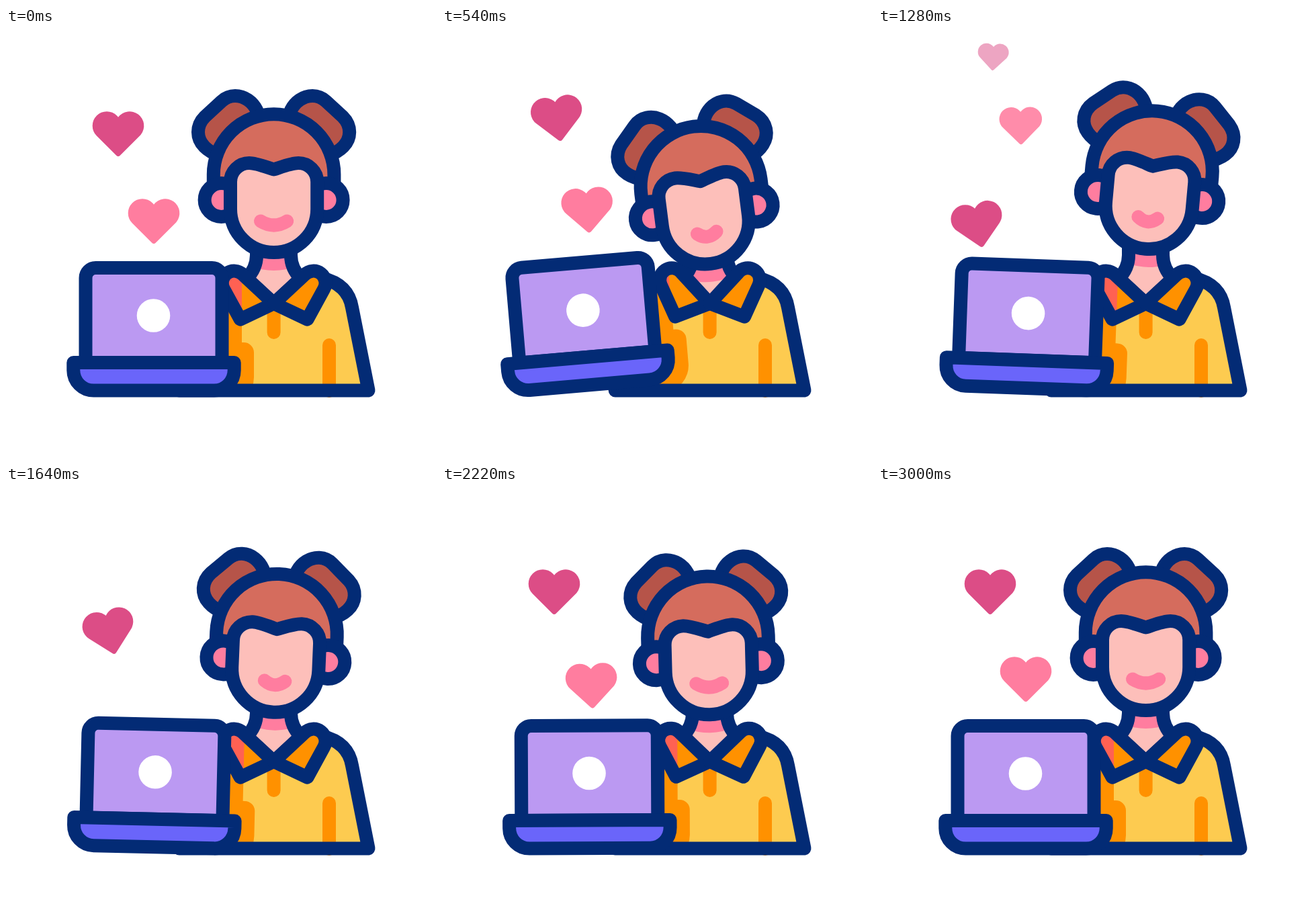
An HTML page with a canvas for the animation above (3600 ms loop, 640 by 640 pixels).

```html
<!DOCTYPE html>
<html lang="en">
<head>
<meta charset="utf-8">
<title>Chatting with hearts</title>
<style>
html, body { margin: 0; width: 100%; height: 100%; overflow: hidden; background: #fff; }
canvas { display: block; width: 640px; height: 640px; }
</style>
</head>
<body>
<canvas id="stage"></canvas>
<script>
const LOOP = 3600, MOVE = 3000, STEP = 20;
const CX = 398.6, RAD = Math.PI / 180;
const NAVY = '#032b75', HAIR = '#d56c5d', BUN = '#b65449', SKIN = '#fdbfba',
      PINK = '#ff7d9f', ROSE = '#dc4d86', YELLOW = '#fdcb50', ORANGE = '#ff9100',
      RED = '#ff6153', LILAC = '#bb99f2', VIOLET = '#6a65fa';

const canvas = document.getElementById('stage');
const ctx = canvas.getContext('2d');
const dpr = window.devicePixelRatio || 1;
canvas.width = canvas.height = Math.round(640 * dpr);

const wave = turns => Math.sin(Math.PI * turns);
const span = (t, from, to) => Math.min(1, Math.max(0, (t - from) / (to - from)));
function ease(t, from, to) {
  const u = span(t, from, to);
  return u * u * (3 - 2 * u);
}

// Eased swing from one [time, value] peak to the next, starting at rest.
function swing(...peaks) {
  return t => {
    let time = 0, value = 0;
    for (const [next, goal] of peaks) {
      if (t < next) return value + (goal - value) * ease(t, time, next);
      time = next;
      value = goal;
    }
    return value;
  };
}

const headTilt = swing([600, -7.5], [1400, 6], [2000, -4.2], [2500, 2.4], [3000, 0]);
const bunTilt = swing([780, -6.4], [1340, 4.2], [2000, -4.2], [2500, 2.7], [3000, 0]);
const headDrop = swing([510, 17.2], [880, 0], [1280, -5.3], [2000, 10.5], [2500, 0]);
const laptopTilt = swing([660, -5.4], [1380, 2.5], [2000, -0.6], [2400, 0]);
const smile = swing([500, -5.2], [1400, -5.2], [2300, 0]);
const collarLift = t => 0.6 * Math.max(0, -headTilt(t));

// Each heart floats off its resting place and a new one rises into it.
const hearts = [
  { color: ROSE, x: 167, y: 157.5,
    leave: { from: 150, to: 1650, rise: 135, sway: 9.5, turns: 1.25, fade: 1080 },
    enter: { from: 500, to: 2180, rise: 245, sway: -18.6 } },
  { color: PINK, x: 220, y: 287.5,
    leave: { from: 250, to: 2000, rise: 225, sway: -12, turns: 1.55, fade: 1195 },
    enter: { from: 750, to: 2430, rise: 227, sway: 19.6 } }
];

const path = d => new Path2D(d);
const shirt = path('M470 372C495 378 511 392 515 416L539.5 539.5H257.7L282 416C286 392 302 378 327 372Z');
const neck = path('M373 300V338C373 352 368 363 358 373L398.6 410L439.2 373C429 363 424 352 424 338V300Z');
const collar = path('M398.6 410L352.5 367A18 18 0 0 0 324.3 389L348.7 433.6Z');
const shade = path('M200 330H351V468H354A15 15 0 0 1 369 483V520A40 40 0 0 1 329 560H200Z');
const bun = path('M318 190C300 184 286 172 286 155C286 146 290 138 296 132L321 109C327 103.5 333 101 341 101C355 101 367 110 373 122L380 140Z');
const hair = path('M308.8 232V218A89.8 89.8 0 0 1 488.4 218V232Z');
const face = path('M334 269.5V229A28 28 0 0 1 362 201C372 201 386 206.5 398.6 210.5C411 206.5 425 201 435.2 201A28 28 0 0 1 463.2 229V269.5A64.6 64.6 0 0 1 334 269.5Z');
const screen = path('M118.5 498V372A15 15 0 0 1 133.5 357H306.5A15 15 0 0 1 321.5 372V498Z');
const base = path('M100.3 498H339.7V509.5A30 30 0 0 1 309.7 539.5H130.3A30 30 0 0 1 100.3 509.5Z');
const heart = heartPath();

function heartPath() {
  const p = new Path2D();
  p.arc(-17, -12, 21.3, 135 * RAD, 323 * RAD);
  p.arc(17, -12, 21.3, 217 * RAD, 405 * RAD);
  p.lineTo(3, 32);
  p.quadraticCurveTo(0, 35, -3, 32);
  p.closePath();
  return p;
}

function circle(x, y, r) {
  const p = new Path2D();
  p.arc(x, y, r, 0, 2 * Math.PI);
  return p;
}

function mouth(half) {
  return path(`M${CX - half} 287.5Q${CX} 299.5 ${CX + half} 287.5`);
}

function fill(p, color) {
  ctx.fillStyle = color;
  ctx.fill(p);
}

function line(p, color = NAVY) {
  ctx.strokeStyle = color;
  ctx.stroke(p);
}

function outlined(p, color) {
  fill(p, color);
  line(p);
}

function group(draw) {
  ctx.save();
  draw();
  ctx.restore();
}

function turn(x, y, deg, shift = 0) {
  ctx.translate(x, y + shift);
  ctx.rotate(deg * RAD);
  ctx.translate(-x, -y);
}

// Draws once as is and once reflected about the body's axis.
function bothSides(draw) {
  group(draw);
  group(() => {
    ctx.translate(2 * CX, 0);
    ctx.scale(-1, 1);
    draw();
  });
}

const placeHead = t => turn(CX, 322, headTilt(t), headDrop(t));

// The laptop rocks on whichever bottom corner is down.
function placeLaptop(t) {
  const deg = laptopTilt(t);
  turn(219.5, 539.5, deg, -96 * Math.abs(Math.sin(deg * RAD)));
}

function clipped(area, place, p, color) {
  group(() => {
    ctx.clip(area);
    place();
    fill(p, color);
  });
}

function drawBody(t) {
  const onLaptop = () => placeLaptop(t);
  fill(shirt, YELLOW);
  clipped(shirt, onLaptop, shade, ORANGE);
  line(path('M398.6 415V453'), ORANGE);
  line(path('M481 472V540'), ORANGE);
  line(shirt);

  fill(neck, SKIN);
  clipped(neck, () => placeHead(t), circle(CX, 269.5, 91.5), PINK);
  line(neck);

  const flap = new Path2D();
  const lift = new DOMMatrix().translate(CX, 410).rotate(collarLift(t)).translate(-CX, -410);
  flap.addPath(collar, lift);
  bothSides(() => fill(flap, ORANGE));
  clipped(flap, onLaptop, shade, RED);
  bothSides(() => line(flap));
}

function drawHead(t) {
  group(() => {
    placeHead(t);
    group(() => {
      turn(CX, 218, bunTilt(t));
      bothSides(() => outlined(bun, BUN));
    });
    outlined(hair, HAIR);
    bothSides(() => outlined(circle(320.6, 256, 25), PINK));
    outlined(face, SKIN);
    line(mouth(19.6 + smile(t)), PINK);
  });
}

function drawHeart(color, x, y, tilt, size = 1, alpha = 1) {
  group(() => {
    ctx.globalAlpha = alpha;
    ctx.translate(x, y);
    ctx.rotate(tilt * RAD);
    ctx.scale(size, size);
    fill(heart, color);
  });
}

function drawHearts({ color, x, y, leave, enter }, t) {
  const up = ease(t, leave.from, leave.to);
  const gone = span(t, leave.fade, leave.fade + 400);
  drawHeart(color,
    x + leave.sway * wave(up * leave.turns * 0.8),
    y - leave.rise * up,
    -13 * wave(up * leave.turns),
    1 - 0.8 * gone, 1 - ease(gone, 0, 1));

  if (t < enter.from) return;
  const left = 1 - ease(t, enter.from, enter.to);
  drawHeart(color, x + enter.sway * wave(left), y + enter.rise * left, -15 * wave(left * 1.35));
}

function drawLaptop(t) {
  group(() => {
    placeLaptop(t);
    outlined(screen, LILAC);
    fill(circle(219.5, 428, 24.8), '#fff');
    outlined(base, VIOLET);
  });
}

function draw(t) {
  ctx.setTransform(dpr, 0, 0, dpr, 0, 0);
  ctx.fillStyle = '#fff';
  ctx.fillRect(0, 0, 640, 640);
  ctx.lineWidth = 20;
  ctx.lineCap = ctx.lineJoin = 'round';
  drawBody(t);
  drawHead(t);
  hearts.forEach(h => drawHearts(h, t));
  drawLaptop(t);
}

function tick() {
  const t = performance.now() % LOOP;
  draw(Math.min(MOVE, Math.floor(t / STEP) * STEP));
  requestAnimationFrame(tick);
}
tick();
</script>
</body>
</html>
```
